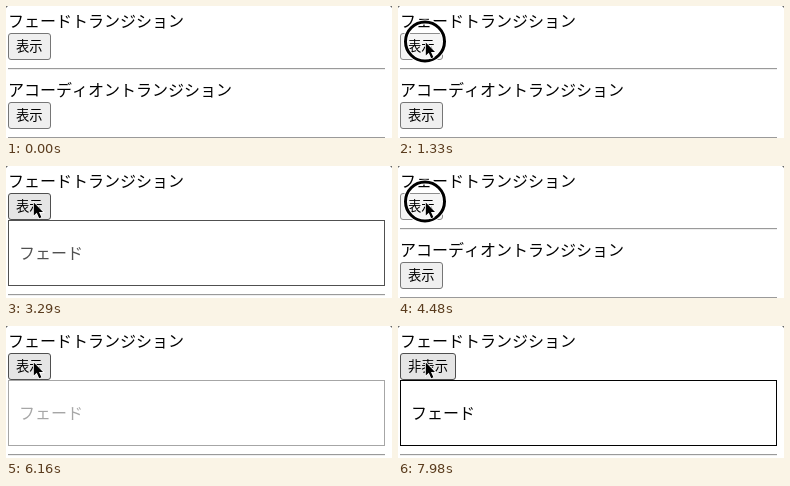
Animation, 386 px wide and 132 px high, one loop 8.33 s. Source, as an HTML page:

```html
<!DOCTYPE html>
<html lang="ja">
<head>
<meta charset="utf-8">
<title>トランジション</title>
<style>
  html, body { margin: 0; width: 100%; height: 100%; overflow: hidden; background: #fff; }
  svg { display: block; width: 386px; height: 132px; }
  text { font: 16px "Noto Sans CJK JP", "Noto Sans CJK", sans-serif; font-kerning: none; }
  .button text { font-size: 13.333px; }
  .button rect { fill: #efefef; stroke: #767676; }
  .button.hover rect { fill: #e5e5e5; stroke: #4f4f4f; }
  .button.active rect { fill: #f5f5f5; stroke: #8d8d8d; }
  .rule { fill: #9a9a9a; }
  .rule-light { fill: #eee; }
  .corner { fill: #666; }
  #panel rect { fill: none; stroke: #000; }
  #ring { fill: none; }
</style>
</head>
<body>
<svg viewBox="0 0 386 132">
  <defs>
    <g id="hr">
      <rect class="rule" x="2" width="377" height="1"/>
      <rect class="rule-light" x="2" y="1" width="377" height="1"/>
    </g>
  </defs>

  <path class="corner" d="M0 0H2L0 2ZM386 0H384L386 2Z"/>
  <text x="2" y="21">フェードトランジション</text>
  <g id="toggle" class="button">
    <rect x="2.5" y="27.5" width="42" height="26" rx="2.5"/>
    <text x="10" y="45">表示</text>
  </g>

  <g id="panel">
    <rect x="2.5" y="54.5" width="376" height="65"/>
    <text x="13" y="93">フェード</text>
  </g>

  <g id="below">
    <use href="#hr" y="62"/>
    <text x="2" y="90">アコーディオントランジション</text>
    <g class="button">
      <rect x="2.5" y="96.5" width="42" height="26" rx="2.5"/>
      <text x="10" y="114">表示</text>
    </g>
    <use href="#hr" y="131"/>
  </g>

  <g id="pointer">
    <g id="ring">
      <circle cy=".5" r="19.5" stroke="#fff" stroke-width="5"/>
      <circle cy=".5" r="19.5" stroke="#000" stroke-width="3"/>
    </g>
    <path d="M.8 1.6V14.4L3.8 11.7L6.2 17.2L8.4 16.2L6 10.9H10Z"
          stroke="#fff" stroke-width="1.6" paint-order="stroke"/>
  </g>
</svg>

<script>
  const LOOP = 8330, TICK = 70, FADE = 500, PANEL_HEIGHT = 66;

  // Times in ms, as [from, to) spans.
  const rings = [[630, 770], [1260, 1400], [3010, 3150], [4480, 4620], [5880, 6020], [7350, 7560]];
  const presses = [[1330, 1400], [3080, 3220], [4480, 4620], [5880, 6020], [7350, 7560]];
  const hovers = [[560, 910], [980, LOOP]];
  const visits = [
    { show: 1400, hide: 3220, fadeOut: 3185, close: 3780 },
    { show: 4620, hide: 6020, fadeOut: 5970, close: 6580 },
    { show: 7560, hide: LOOP, fadeOut: LOOP, close: LOOP }
  ];

  const $ = id => document.getElementById(id);
  const toggle = $('toggle'), panel = $('panel'), below = $('below');
  const pointer = $('pointer'), ring = $('ring');
  const face = toggle.querySelector('rect'), label = toggle.querySelector('text');

  const clamp = x => Math.min(1, Math.max(0, x));
  const within = (spans, t) => spans.some(([from, to]) => t >= from && t < to);
  const show = (el, on) => el.setAttribute('visibility', on ? 'visible' : 'hidden');
  const move = (el, x, y) => el.setAttribute('transform', `translate(${x} ${y})`);

  // CSS "ease": cubic-bezier(.25, .1, .25, 1)
  function ease(x) {
    x = clamp(x);
    const bezier = (a, b, u) => 3 * a * u * (1 - u) ** 2 + 3 * b * u * u * (1 - u) + u ** 3;
    let low = 0, high = 1;
    for (let i = 0; i < 24; i++) {
      const mid = (low + high) / 2;
      if (bezier(.25, .25, mid) < x) low = mid; else high = mid;
    }
    return bezier(.1, 1, low);
  }

  function drawPointer(t) {
    const p = clamp((t - 70) / 560);
    const s = p * p * (3 - 2 * p);
    move(pointer, 367 - 340 * s, 113 - 79 * s + (t >= 1120 ? 1 : 0));
    show(pointer, t >= 70);
    show(ring, within(rings, t));
  }

  function drawPage(t) {
    const visit = visits.find(v => t >= v.show && t < v.close);
    const shown = visit && t < visit.hide;
    label.textContent = shown ? '非表示' : '表示';
    face.setAttribute('width', shown ? 55 : 42);
    toggle.classList.toggle('hover', within(hovers, t));
    toggle.classList.toggle('active', within(presses, t));

    let opacity = 0;
    if (visit) {
      opacity = shown
        ? ease((t - visit.show + 20) / FADE)
        : 1 - ease((t - visit.fadeOut) / FADE);
    }
    panel.setAttribute('opacity', opacity);
    move(below, 0, visit ? PANEL_HEIGHT : 0);
  }

  // The screen is sampled once per tick.
  function draw() {
    const t = Math.floor(performance.now() % LOOP / TICK) * TICK;
    drawPointer(t);
    drawPage(t);
    requestAnimationFrame(draw);
  }
  draw();
</script>
</body>
</html>
```
